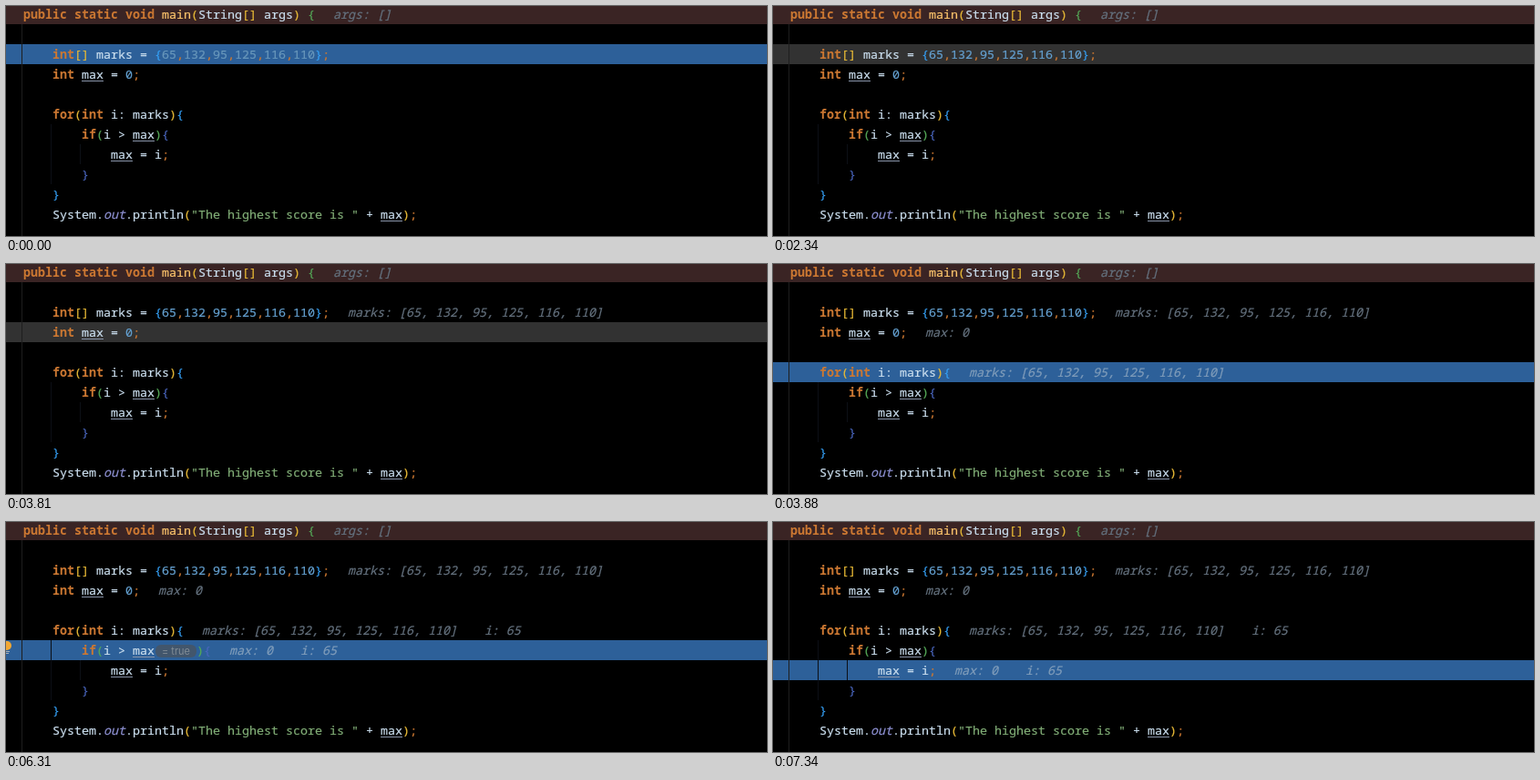
Write an HTML page that moves like this. It is 835 by 253 pixels and loops after 8000 ms.

```html
<!DOCTYPE html>
<html lang="en">
<head>
<meta charset="utf-8">
<title>Debugger steps</title>
<style>
html, body { margin: 0; width: 100%; height: 100%; overflow: hidden; background: #000; }
body { position: relative; font: 13.333px/22px "Noto Sans Mono", "DejaVu Sans Mono", monospace; color: #cbdfef; -webkit-text-stroke: .2px; }
.row { position: absolute; left: 0; width: 100%; height: 22px; white-space: pre; box-sizing: border-box; }
.row.run { background: #2d6099; }
.row.left { background: #323232; }
.key { color: #cc7832; font-weight: bold; -webkit-text-stroke: 0; }
.end { color: #cc7832; }
.num { color: #64a0d0; }
.run .num { color: #6897bb; }
.str { color: #80ad76; }
.fn { color: #ffc66d; }
.out { color: #8c8fd0; font-style: italic; }
.max { box-shadow: inset 0 -1px #8793a8; display: inline-block; height: 19px; vertical-align: top; }
.y { color: #e8ba36; }
.g { color: #54a857; }
.b { color: #359ff4; }
.p { color: #4a66bd; }
.hint { margin-left: 20px; font-style: italic; color: #64717e; }
.hint + .hint { margin-left: 30px; }
.run .hint, .left .hint { color: #7f9cba; }
.pill { display: inline-block; box-sizing: border-box; width: 45px; height: 14px; margin: 5px 0 0 1px; vertical-align: top;
  border-radius: 6px; background: #42566c; color: #818c96; font: 11px/14px Inter, sans-serif; text-align: center; -webkit-text-stroke: 0; }
.guide { position: absolute; width: 1px; }
svg { position: absolute; left: 0; top: 0; }
</style>
</head>
<body>
<script>
const LOOP = 8000;
const MARKS = "marks: [65, 132, 95, 125, 116, 110]";

// x, code, bracket colours, hints as [text, from, to]
const LINES = [
  [19, "public static void main(String[] args) {", "yyyyg", [["args: []", 0]]],
  [51, "", ""],
  [51, "int[] marks = {65,132,95,125,116,110};", "yybb", [[MARKS, 2370]]],
  [51, "int max = 0;", "", [["max: 0", 3880]]],
  [51, "", ""],
  [51, "for(int i: marks){", "yyb", [[MARKS, 3880], ["i: 65", 5430]]],
  [83, "if(i > max~){", "ggp", [["max: 0", 5500, 7310], ["i: 65", 5500, 7310]]],
  [115, "max = i;", "", [["max: 0", 7340], ["i: 65", 7340]]],
  [83, "}", "p"],
  [51, "}", "b"],
  [51, 'System.out.println("The highest score is " + max);', "yy"]
];

// time, row, style
const STEPS = [
  [0, 2, "run"], [2340, 2, "left"], [2370, 3, "run"], [3810, 3, "left"],
  [3880, 5, "run"], [5360, 5, "left"], [5430, 6, "run"], [7280, 6, "left"], [7310, 7, "run"]
];

const TOKEN = /"[^"]*"|\b(?:public|static|void|int|for|if|main|max|out)\b|\d+|[()[\]{};,~]/g;
const timed = [];

function add(parent, cls, text = "", from = 0, to = LOOP) {
  const el = document.createElement("span");
  el.className = cls;
  el.textContent = text;
  parent.append(el);
  if (from > 0 || to < LOOP) timed.push({ el, from, to });
  return el;
}

function tokenClass(s, colours) {
  if (s[0] === '"') return "str";
  if (/\d/.test(s)) return "num";
  if (/[;,]/.test(s)) return "end";
  if (/[()[\]{}]/.test(s)) return colours.shift();
  return { main: "fn", max: "max", out: "out" }[s] || "key";
}

const rows = LINES.map(([x, code, brackets, hints = []], i) => {
  const row = add(document.body, "row");
  row.style.top = i * 22 - 2 + "px";
  row.style.paddingLeft = x + "px";
  if (i === 0) row.style.background = "#3a2424";
  const colours = [...brackets];
  let pos = 0;
  for (const m of code.matchAll(TOKEN)) {
    row.append(code.slice(pos, m.index));
    if (m[0] === "~") add(row, "pill", "= true", 5500, 7310);
    else add(row, tokenClass(m[0], colours), m[0]);
    pos = m.index + m[0].length;
  }
  row.append(code.slice(pos));
  for (const [text, from, to] of hints) add(row, "hint", text, from, to);
  return row;
});

for (const [x, top, bottom, colour] of [[17, 20, 253, "#1e1e1e"], [49, 130, 196, "#0c0f16"], [81, 152, 174, "#0c0f16"]]) {
  const g = add(document.body, "guide");
  g.style.cssText = `left:${x}px;top:${top}px;height:${bottom - top}px;background:${colour}`;
}

function addIcon(shapes, from, to) {
  document.body.insertAdjacentHTML("beforeend", `<svg width="835" height="253">${shapes}</svg>`);
  timed.push({ el: document.body.lastElementChild, from, to });
}
addIcon('<circle cx="1" cy="136" r="5" fill="#f2a732"/><path d="M0 142.5h4M0 144.5h3" stroke="#a9b0b5"/>', 6310, 7280);
addIcon('<path d="M722 212.5h3M726 212.5h3M725.5 213v14M722 227.5h3M726 227.5h3" stroke="#ccc" fill="none"/>', 960, 1000);

const start = performance.now();
function draw() {
  const t = (performance.now() - start) % LOOP;
  const [, active, style] = STEPS.findLast(s => s[0] <= t);
  rows.forEach((row, i) => { row.className = i === active ? "row " + style : "row"; });
  for (const { el, from, to } of timed) el.style.display = t >= from && t < to ? "" : "none";
  requestAnimationFrame(draw);
}
draw();
</script>
</body>
</html>
```
